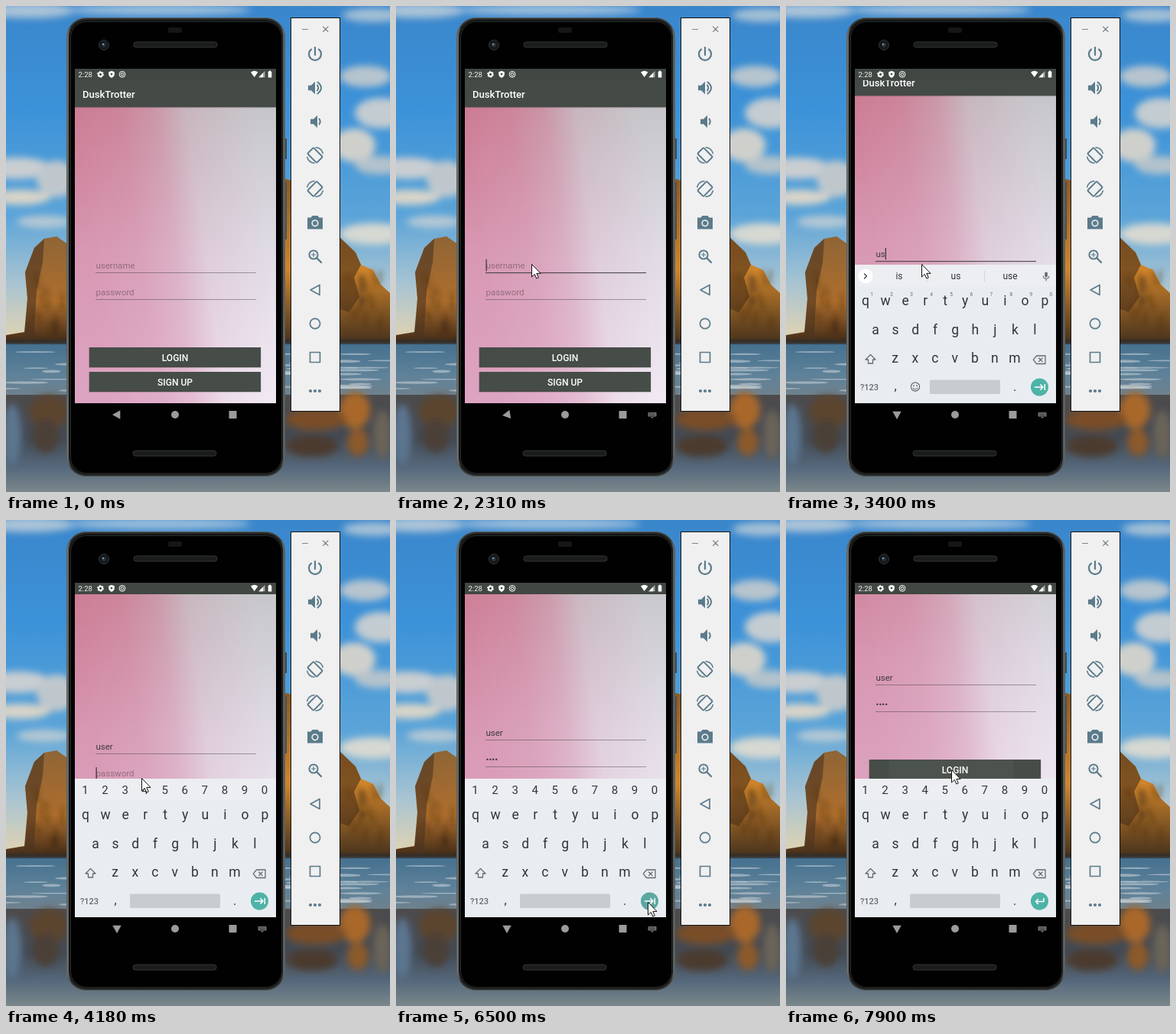
An HTML page for the animation above (8000 ms loop, 502 px wide and 635 px high).

```html
<!DOCTYPE html>
<html lang="en">
<head>
<meta charset="utf-8">
<title>Login demo</title>
<style>
  html, body { margin: 0; width: 100%; height: 100%; overflow: hidden; }
  svg { display: block; width: 100%; height: 100%; font-family: Roboto, sans-serif; }
  .mid { text-anchor: middle; }
  .bold { font-weight: 500; fill: #fff; }
  .line { fill: none; stroke-linecap: round; stroke-linejoin: round; }
</style>
</head>
<body>
<svg viewBox="0 0 502 635" preserveAspectRatio="none">
  <defs>
    <linearGradient id="sky" x2="0" y2="1">
      <stop offset="0" stop-color="#3a86cb"/><stop offset=".3" stop-color="#3c92d8"/>
      <stop offset=".62" stop-color="#5ba4d8"/><stop offset=".82" stop-color="#a8c4d2"/><stop offset="1" stop-color="#e6d5ae"/>
    </linearGradient>
    <linearGradient id="sea" x2="0" y2="1">
      <stop offset="0" stop-color="#44708f"/><stop offset=".6" stop-color="#5f8299"/><stop offset="1" stop-color="#71818c"/>
    </linearGradient>
    <linearGradient id="sand" x2="0" y2="1">
      <stop offset="0" stop-color="#4d4b4c"/><stop offset=".45" stop-color="#424a55"/>
      <stop offset=".75" stop-color="#56697c"/><stop offset="1" stop-color="#7b878b"/>
    </linearGradient>
    <linearGradient id="rock" x2="0" y2="1">
      <stop offset="0" stop-color="#8f6536"/><stop offset=".6" stop-color="#ad6e2d"/><stop offset="1" stop-color="#3d2817"/>
    </linearGradient>
    <linearGradient id="rockLit" x2="0" y2="1">
      <stop offset="0" stop-color="#8a5a26"/><stop offset=".55" stop-color="#cf852c"/><stop offset="1" stop-color="#44301c"/>
    </linearGradient>
    <linearGradient id="pink" x2="0" y2="1">
      <stop offset="0" stop-color="#cd7b93"/><stop offset=".5" stop-color="#d898b3"/><stop offset="1" stop-color="#dda5c2"/>
    </linearGradient>
    <linearGradient id="lilac" x2="0" y2="1">
      <stop offset="0" stop-color="#c6c6ca"/><stop offset=".5" stop-color="#e0dce5"/><stop offset="1" stop-color="#f2eef7"/>
    </linearGradient>
    <linearGradient id="tilt" gradientUnits="userSpaceOnUse" x1="110" y1="340" x2="345" y2="308">
      <stop offset="0" stop-color="#000"/><stop offset=".28" stop-color="#222"/><stop offset=".47" stop-color="#5c5c5c"/>
      <stop offset=".64" stop-color="#c4c4c4"/><stop offset="1" stop-color="#fff"/>
    </linearGradient>
    <linearGradient id="rim">
      <stop offset="0" stop-color="#7c807f"/><stop offset=".02" stop-color="#2b2e2d"/>
      <stop offset=".98" stop-color="#2b2e2d"/><stop offset="1" stop-color="#6c706f"/>
    </linearGradient>
    <mask id="fade"><rect x="90" y="132" width="263" height="387" fill="url(#tilt)"/></mask>
    <clipPath id="screen"><rect x="90" y="82" width="263" height="438"/></clipPath>
    <clipPath id="page"><rect x="90" y="97" width="263" height="422"/></clipPath>
    <clipPath id="loginShape"><rect x="109" y="446" width="224" height="26"/></clipPath>
    <filter id="soft" x="-50%" y="-50%" width="200%" height="200%"><feGaussianBlur stdDeviation="5"/></filter>
    <filter id="hazy" x="-50%" y="-50%" width="200%" height="200%"><feGaussianBlur stdDeviation="3"/></filter>
  </defs>
  <g id="scenery"></g>
  <g id="phone"></g>
  <g clip-path="url(#screen)">
    <g clip-path="url(#page)"><g id="content"></g></g>
    <g id="status"></g>
    <g id="keyboard"></g>
  </g>
  <g id="nav"></g>
  <g id="panel"></g>
  <path id="pointer" d="M.5 .5V17L4.3 13.4L6.8 19L9.3 17.9L6.8 12.4H12Z" fill="#fff" stroke="#111"/>
</svg>
<script>
const $ = id => document.getElementById(id);
const rect = (x, y, w, h, fill, more = '') => `<rect x="${x}" y="${y}" width="${w}" height="${h}" fill="${fill}" ${more}/>`;
const disc = (x, y, r, fill, more = '') => `<circle cx="${x}" cy="${y}" r="${r}" fill="${fill}" ${more}/>`;
const blob = (x, y, rx, ry, fill, more = '') => `<ellipse cx="${x}" cy="${y}" rx="${rx}" ry="${ry}" fill="${fill}" ${more}/>`;
const shape = (d, fill, more = '') => `<path d="${d}" fill="${fill}" ${more}/>`;
const stroke = (d, color, width = 1.5, more = '') => `<path class="line" d="${d}" stroke="${color}" stroke-width="${width}" ${more}/>`;
const label = (x, y, size, str, more = '') => `<text x="${x}" y="${y}" font-size="${size}" ${more}>${str}</text>`;
const group = (body, more = '') => `<g ${more}>${body}</g>`;
const at = (x, y, body) => group(body, `transform="translate(${x} ${y})"`);

let seed = 7;
const random = () => (seed = seed * 16807 % 2147483647) / 2147483647;
const many = (n, draw) => Array.from({length: n}, (_, i) => draw(i)).join('');

function scenery() {
  const clouds = [
    [30, 6, 60, 10, '#a9c3d8'], [200, 5, 120, 7, '#9dbfdc'], [15, 212, 44, 14, '#c9ced1'], [66, 226, 26, 24, '#bfc7cc'],
    [18, 250, 40, 10, '#d8d4c9'], [50, 282, 36, 8, '#b4c8d4'], [480, 12, 40, 9, '#a3bfd6'], [470, 92, 34, 14, '#b6c4ce'],
    [490, 140, 34, 20, '#c3ccd1'], [455, 182, 28, 22, '#cfd0cc'], [488, 208, 32, 12, '#b3c2cc'], [480, 298, 44, 14, '#d6d8d2']
  ].map(c => blob(...c)).join('');
  const foam = many(44, () => blob(random() * 502, 452 + random() * 52, 12 + random() * 24, .7 + random() * 1.3, '#ccd6da', 'opacity=".55"'));
  const cracks = many(26, i => {
    const x = i % 2 ? 442 + random() * 50 : 32 + random() * 42, y = 345 + random() * 75;
    return stroke(`M${x} ${y}l${6 - random() * 10} ${8 + random() * 14}`, '#4a2e17', 4, 'opacity=".45"');
  });
  const glow = [
    [56, 530, 26, 22, '#5c452f'], [52, 562, 18, 22, '#4b4038'], [8, 560, 12, 40, '#5b7690'],
    [456, 528, 20, 24, '#a9682a'], [405, 540, 40, 14, '#7a4d25'], [460, 570, 14, 18, '#8c5a2c'], [492, 560, 12, 32, '#6b6458'], [400, 575, 34, 14, '#4c3b2e']
  ].map(c => blob(...c)).join('');
  return rect(0, 0, 502, 442, 'url(#sky)') + group(clouds, 'filter="url(#soft)"')
    + shape('M0 442V430L24 426L28 382L25 348L37 316L50 304L66 301L82 312V442Z', 'url(#rock)')
    + shape('M25 348L37 316L50 304L48 335L40 372L36 440H24L28 382Z', '#4c3420', 'opacity=".6"')
    + shape('M362 442V225L380 230L437 303L457 322L464 338L480 345L490 364L502 375V442Z', 'url(#rockLit)')
    + shape('M437 303L457 322L464 338L455 355L462 380L448 400L437 396Z', '#4c311a', 'opacity=".6"')
    + group(cracks, 'filter="url(#hazy)"') + rect(0, 440, 502, 72, 'url(#sea)') + rect(0, 435, 502, 7, '#35302b', 'opacity=".75"') + foam
    + rect(0, 508, 502, 127, 'url(#sand)') + group(glow, 'filter="url(#soft)"');
}

function phone() {
  const grille = (x, y) => rect(x, y, 109, 7, '#1a1c1b', 'rx="3.5" stroke="#353736"');
  return rect(364, 173, 3, 27, '#444847') + rect(364, 230, 3, 75, '#4d5150')
    + rect(79.5, 15.5, 285, 599, 'url(#rim)', 'rx="25" stroke="#5c605f"')
    + rect(82, 18, 280, 594, '#131514', 'rx="23"')
    + rect(84.5, 20.5, 276, 590, '#010101', 'rx="21" stroke="#262928"')
    + grille(167, 47) + grille(166, 581) + rect(212, 28, 18, 7, '#151616', 'rx="2"')
    + disc(128, 51, 6.5, '#15181a', 'stroke="#30363a"') + disc(128, 51, 3, '#253038') + disc(127, 50, 1.2, '#7d98a8');
}

function content() {
  const button = (y, str, inner = '') =>
    rect(108, y, 225.5, 27, '#000', 'opacity=".2" rx="1"') + rect(109, y, 224, 26, '#464c47') + inner
    + label(221, y + 17.8, 12, str, 'class="mid bold"');
  const field = (id, y) => label(117.5, y, 11.5, '', `id="${id}"`) + rect(117, y + 5, 210, 1, '#333', `id="${id}Line"`);
  const ripple = group(disc(216, 459, 0, '#fff', 'id="ripple" opacity=".03"'), 'clip-path="url(#loginShape)"');
  return rect(90, 132, 263, 387, 'url(#pink)') + rect(90, 132, 263, 387, 'url(#lilac)', 'mask="url(#fade)"')
    + rect(90, 82, 263, 50, '#444a46') + rect(90, 132, 263, 1.2, '#4b4247', 'opacity=".4"')
    + label(100, 120, 13, 'DuskTrotter', 'class="bold"')
    + field('user', 343) + field('pass', 378) + rect(0, 0, 1.2, 15.5, '#333', 'id="caret"')
    + button(446, 'LOGIN', ripple) + button(478, 'SIGN UP');
}

function status() {
  return rect(90, 82, 263, 15, '#414742') + label(94.5, 93, 9.5, '2:28', 'fill="#f4f4f4"')
    + disc(123.5, 89.3, 2.6, 'none', 'stroke="#fff" stroke-width="2"')
    + disc(123.5, 89.3, 4, 'none', 'stroke="#fff" stroke-width="1" stroke-dasharray="2 2.19"')
    + shape('M138 84.8L141.8 86.2V89.2Q141.5 92.3 138 94Q134.5 92.3 134.2 89.2V86.2Z', '#fff') + disc(138, 89, 1.3, '#414742')
    + disc(152, 89.3, 3.9, 'none', 'stroke="#fff" stroke-width="1"') + disc(152, 89.3, 1.8, 'none', 'stroke="#fff" stroke-width="1"')
    + shape('M320 86.6Q324.7 83 329.4 86.6L324.7 93Z', '#fff')
    + shape('M338.5 84.8V93.3H330.3Z', '#fff', 'opacity=".55"') + shape('M336 87.5V93.3H330.3Z', '#fff')
    + rect(342.7, 85.6, 4.6, 8, '#fff', 'rx=".7"') + rect(344, 84.6, 2, 2, '#fff');
}

const INK = '#30363a', GREY = '#666b6f';
const spread = (chars, x, y, size, more = '') =>
  [...chars].map((c, i) => label(x + i * 26.05, y, size, c, `class="mid" ${more}`)).join('');

function keyboard() {
  const chevron = (id, dir) => stroke(`M${104 + dir * 1.5} 350l${-dir * 3} 3l${dir * 3} 3`, INK, 1.2, `id="${id}"`);
  const mic = rect(338.3, 347.5, 3.6, 7, GREY, 'rx="1.8"') + stroke('M336.3 353Q336.5 356.3 340 356.3Q343.7 356.3 343.9 353M340 356.5V359', GREY, 1.1);
  const tools = disc(139, 352, 3.3, 'none', `stroke="${GREY}" stroke-width="1.3"`) + stroke('M141.5 354.5L145 358', GREY, 1.5)
    + stroke('M173 348.5H182.5V355L179.5 358H173ZM175.5 353.5Q178 356 180 353.5', GREY, 1.2)
    + label(216, 356.5, 9, 'GIF', `class="mid" font-weight="900" fill="${GREY}"`)
    + rect(250, 347.5, 7.5, 9, GREY, 'rx="1"') + rect(254, 350.5, 7.5, 8.5, '#e9ecf0', `rx="1" stroke="${GREY}"`)
    + label(251.2, 355, 7, 'G', 'fill="#fff"') + stroke('M256 353.5h4M258 353v1.5l-2 2.5M257 355l2.5 2.5', GREY, .8)
    + rect(278.5, 346, 1, 14, '#d3d6da') + [-4, 0, 4].map(d => disc(302 + d, 353, 1.3, GREY)).join('');
  const words = [148, 222, 293].map((x, i) => label(x, 357, 12, '', `class="mid" id="word${i}" fill="${INK}"`)).join('')
    + rect(185, 346, 1, 14, '#d0d4d8') + rect(259, 346, 1, 14, '#d0d4d8');
  const emoji = disc(169, 497.5, 5.6, 'none', `stroke="${GREY}" stroke-width="1.2"`)
    + disc(167, 496, .9, GREY) + disc(171, 496, .9, GREY) + stroke('M166 499Q169 502.5 172 499', GREY, 1.1);
  return rect(90, 338, 263, 181, '#e9edf1') + rect(90, 338, 263, 28, '#eceef1')
    + group(disc(104, 353, 9.5, '#fff') + chevron('less', 1) + chevron('more', -1) + mic
      + group(tools, 'id="tools"') + group(words, 'id="words"')
      + spread('1234567890', 112, 378.5, 6.5, `fill="${GREY}"`) + emoji, 'id="textMode"')
    + group(spread('1234567890', 103.5, 358, 15, `fill="${INK}"`), 'id="digits"')
    + group(spread('qwertyuiop', 104, 391, 17.5) + spread('asdfghjkl', 117, 428.5, 17.5) + spread('zxcvbnm', 142.7, 466, 17.5), `fill="${INK}"`)
    + stroke('M110.5 455.5L117 462H113.5V467H107.5V462H104Z', GREY, 1.3)
    + stroke('M327.5 457H339V467.5H327.5L323.3 462.2ZM330.5 460l4.6 4.6M335.1 460l-4.6 4.6', GREY, 1.3)
    + label(97, 501.5, 11, '?123', `fill="${GREY}" font-weight="500"`)
    + label(143, 501.5, 16, ',', `class="mid" fill="${INK}"`) + label(299, 502.5, 16, '.', `class="mid" fill="${INK}"`)
    + rect(162, 488.5, 118, 18.5, '#c8ccd0', 'rx="2" id="space"')
    + disc(331.5, 498, 11.5, '#4eb3a7', 'id="action"')
    + stroke('M325.5 498H336M332.8 494.7L336 498L332.8 501.3M338.3 494.5V501.5', '#fff', 1.5, 'id="next"')
    + stroke('M337 494.5V498.5H326.5M329.5 495.5L326.5 498.5L329.5 501.5', '#fff', 1.5, 'id="enter"');
}

function nav() {
  const tint = '#9b9b9b';
  return shape('M139 534L149.3 528.3V539.7Z', tint, 'id="back"') + disc(221, 534, 5, tint) + rect(291.5, 529, 10, 10, tint, 'rx=".5"')
    + group(rect(329.5, 531, 11, 5.5, '#747474', 'rx=".8"') + stroke('M331 532.8H339M331.5 534.8H338.5', '#222', .8, 'stroke-dasharray="1 1"')
      + shape('M333 537h4l-2 2Z', '#747474'), 'id="imeIcon"');
}

function panel() {
  const c = '#5b7b8b', bg = '#f0f0f0';
  const speaker = x => shape(`M${x} -3.2h4l5 -5v16.4l-5 -5h-4Z`, c);
  const turn = rect(-8.5, -5.5, 17, 11, 'none', `rx="1.2" transform="rotate(45)" stroke="${c}" stroke-width="1.9"`)
    + stroke('M1 -10.3Q8.5 -9.5 10.3 -2.5M-1 10.3Q-8.5 9.5 -10.3 2.5', c, 1.5);
  const icons = [
    stroke('M0 -9V1M-5 -6.4A8 8 0 1 0 5 -6.4', c, 2.2),
    speaker(-9) + stroke('M3 -3.5Q5.5 0 3 3.5M3.5 -7.5Q12.5 0 3.5 7.5', c, 2),
    speaker(-6) + stroke('M5.5 -3.5Q8 0 5.5 3.5', c, 2),
    turn,
    group(turn, 'transform="scale(-1 1)"'),
    shape('M-10 -6.5H-5.5L-3.5 -9H3.5L5.5 -6.5H10V8.5H-10Z', c) + disc(0, .8, 4.6, bg) + disc(0, .8, 3, c),
    disc(-2, -2, 5.6, 'none', `stroke="${c}" stroke-width="2"`) + stroke('M2.5 2.5L8 8', c, 2.4) + stroke('M-4.5 -2H.5M-2 -4.5V.5', c, 1.2),
    stroke('M-6 0L6 -6.5V6.5Z', c, 1.7),
    disc(0, 0, 6.6, 'none', `stroke="${c}" stroke-width="1.7"`),
    stroke('M-6.5 -6.5H6.5V6.5H-6.5Z', c, 1.7),
    [-6, 0, 6].map(x => disc(x, 0, 2.1, c)).join('')
  ];
  return rect(372.5, 15.5, 64, 514, bg, 'stroke="#111"')
    + stroke('M387.5 30.5H394.5M414.5 27L421 33.5M421 27L414.5 33.5', '#7d868b', 1.1)
    + icons.map((icon, i) => at(404, 63 + i * 44, icon)).join('');
}

Object.entries({scenery, phone, content, status, keyboard, nav, panel}).forEach(([id, draw]) => $(id).innerHTML = draw());

// Held steps: [time, value]
const PAN = [[0, 0], [2400, 8], [2470, 15], [4090, 18], [4180, 43], [4250, 49], [4330, 50], [6500, 61], [6580, 115], [6660, 131], [6740, 133]];
const RISE = [[0, [30, 0]], [2400, [9, .5]], [2470, [1, .95]], [2540, [0, 1]]];
const TURN = [[0, 0], [2080, -2], [2310, -9], [2400, -62], [2470, -90]];
const USER = [[0, ''], [3230, 'u'], [3310, 'us'], [3460, 'use'], [3630, 'user']];
const PASS = [[0, ''], [4650, 't'], [4710, '•e'], [4880, '••s'], [5030, '•••t'], [5570, '••••']];
const WORDS = [[0, ['', '', '']], [3230, ['you', 'u', 'up']], [3310, ['is', 'us', 'use']], [3460, ['used', 'use', 'user']], [3630, ['users', 'user', 'used']]];
const CARET = [[0, 0], [1545, 1], [2470, 0], [2930, 1], [4090, 0], [4180, 1], [4330, 0], [4650, 1], [5570, 0]];
const FOCUS = [[0, ''], [1470, 'user'], [4090, 'pass'], [6500, '']];
const MOVES = [
  {from: 530, to: 1300, steps: 10, a: [285, 577], b: [177, 337]},
  {from: 5570, to: 6260, steps: 9, a: [177, 337], b: [329, 499]},
  {from: 6660, to: 7270, steps: 8, a: [329, 499], b: [216, 326]}
];

const held = (steps, t) => steps.reduce((value, [time, next]) => t >= time ? next : value, steps[0][1]);
const stepped = (t, from, to, n) => Math.min(n, Math.max(0, Math.floor((t - from) / (to - from) * n + .02))) / n;
const ease = p => p * p * (3 - 2 * p);
const show = (id, on) => $(id).setAttribute('visibility', on ? 'inherit' : 'hidden');
const set = (id, attrs) => Object.entries(attrs).forEach(([key, value]) => $(id).setAttribute(key, value));

function drawField(id, value, hint, focused) {
  $(id).textContent = value || hint;
  set(id, {fill: value ? '#37343a' : '#5d4450', 'fill-opacity': value ? .95 : .55});
  set(id + 'Line', {opacity: focused ? .8 : .42, height: focused ? 1.2 : 1});
}

function render(t) {
  const focus = held(FOCUS, t), user = held(USER, t), pass = held(PASS, t);
  set('content', {transform: `translate(0 ${-held(PAN, t)})`});
  drawField('user', user, 'username', focus === 'user');
  drawField('pass', pass, 'password', focus === 'pass');
  const typed = focus === 'pass' ? pass : user;
  const end = typed && focus ? $(focus).getComputedTextLength() : 0;
  set('caret', {x: 117.5 + end, y: focus === 'pass' ? 366 : 331});
  show('caret', focus && held(CARET, t));
  if (t >= 5110 && pass.endsWith('t')) $('pass').innerHTML = '•••<tspan fill-opacity=".5">t</tspan>';
  set('ripple', {r: t < 7500 ? 0 : 12 + 70 * stepped(t, 7500, 7900, 5)});

  const [drop, alpha] = held(RISE, t), secret = t >= 4180, suggesting = t >= 3230;
  set('keyboard', {transform: `translate(0 ${drop})`, opacity: alpha});
  show('textMode', !secret);
  show('digits', secret);
  show('tools', !suggesting);
  show('words', suggesting);
  show('less', !suggesting);
  show('more', suggesting);
  held(WORDS, t).forEach((word, i) => $('word' + i).textContent = word);
  set('space', secret ? {x: 162, width: 118} : {x: 188, width: 92});
  set('action', {fill: t >= 6430 && t < 6580 ? '#5ba8a1' : '#4eb3a7'});
  show('next', t < 6580);
  show('enter', t >= 6580);
  set('back', {transform: `rotate(${held(TURN, t)} 145 534)`});
  show('imeIcon', t >= 1850);

  const move = MOVES.filter(m => t >= m.from).pop();
  show('pointer', move);
  if (move) {
    const p = ease(stepped(t, move.from, move.to, move.steps));
    const [x, y] = move.a.map((v, i) => v + (move.b[i] - v) * p);
    set('pointer', {transform: `translate(${x} ${y})`});
  }
}

const LOOP = 8000;
let start;
function tick(now) {
  start ??= now;
  render((now - start) % LOOP);
  requestAnimationFrame(tick);
}
render(0);
requestAnimationFrame(tick);
</script>
</body>
</html>
```
